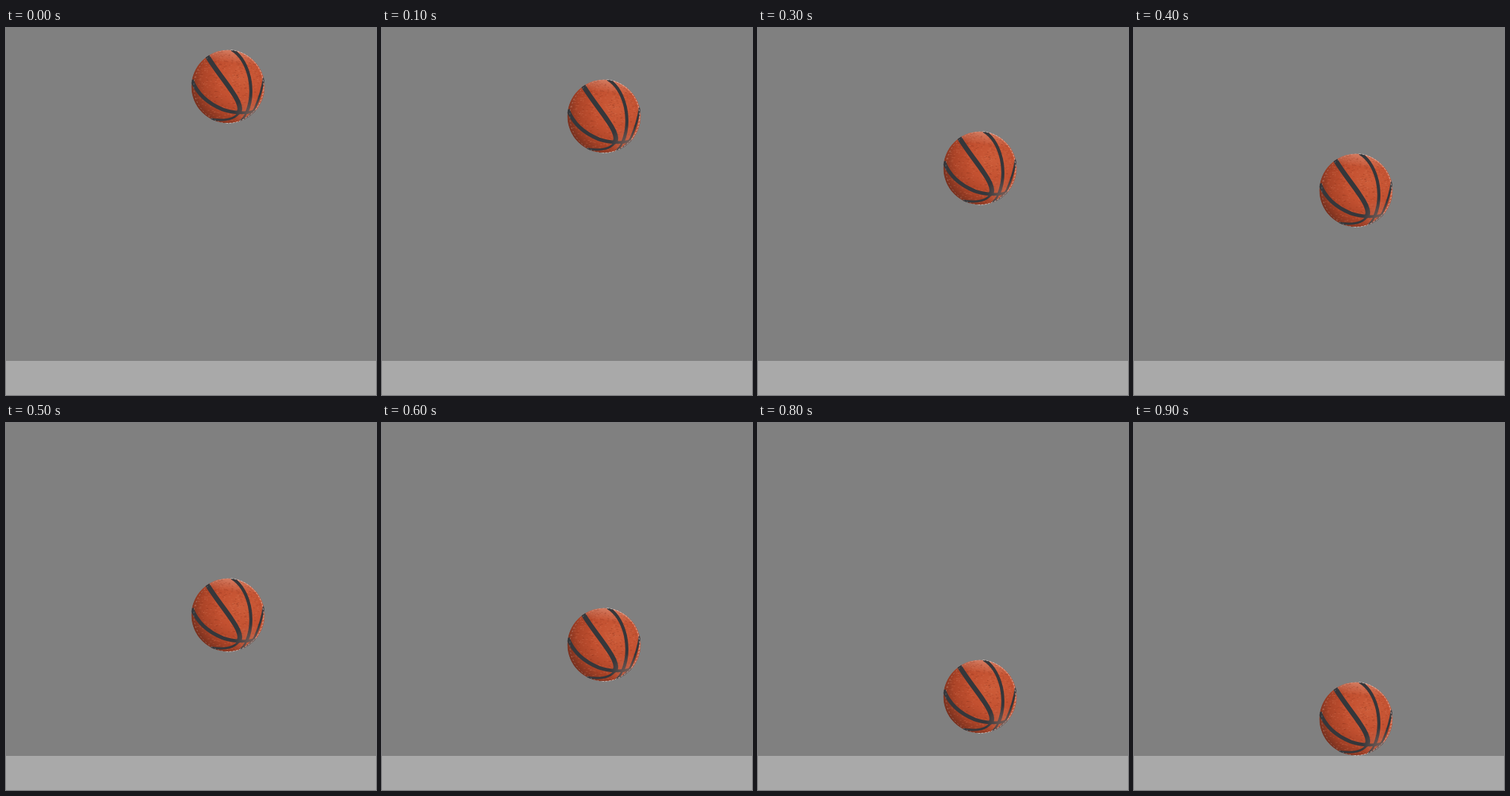
Write an HTML page that moves like this. It is 500 by 495 pixels and loops after 1.7 s.

```html
<!DOCTYPE html>
<html lang="en">
<head>
<meta charset="utf-8">
<title>Falling ball</title>
<style>
  html, body { margin: 0; width: 100%; height: 100%; overflow: hidden; background: #808080; }
  #floor { position: absolute; left: 0; top: 449px; width: 100%; bottom: 0; background: #a9a9a9; }
  #ball { position: absolute; left: 250px; top: 29px; width: 100px; height: 100px; overflow: visible; }
  .seams { fill: none; stroke: #35373b; }
</style>
</head>
<body>
<div id="floor"></div>
<svg id="ball" viewBox="0 0 100 100">
  <defs>
    <radialGradient id="skin" cx="68%" cy="38%" r="72%">
      <stop offset="0" stop-color="#cd5c39"/>
      <stop offset=".45" stop-color="#c25030"/>
      <stop offset=".75" stop-color="#aa4327"/>
      <stop offset="1" stop-color="#74301f"/>
    </radialGradient>
    <linearGradient id="shine" x1=".55" y1="0" x2=".45" y2="1">
      <stop offset="0" stop-color="#f0b09a" stop-opacity=".5"/>
      <stop offset=".18" stop-color="#f0b09a" stop-opacity="0"/>
    </linearGradient>
    <radialGradient id="glow" cx="84%" cy="88%" r="26%">
      <stop offset="0" stop-color="#e09a84" stop-opacity=".4"/>
      <stop offset="1" stop-color="#e09a84" stop-opacity="0"/>
    </radialGradient>
    <clipPath id="round"><circle cx="50" cy="50" r="49.6"/></clipPath>
  </defs>
  <g clip-path="url(#round)">
    <circle cx="50" cy="50" r="49.6" fill="url(#skin)"/>
    <circle cx="50" cy="50" r="49.6" fill="url(#shine)"/>
    <g id="grain" fill="none" stroke-width=".9"></g>
    <g class="seams">
      <path stroke-width="6.4" d="M22 9 C33 27 45 41 55 56 C62 66 66 73 66 80 L65 86"/>
      <path stroke-width="3" d="M65 85 C60 93 48 97 27 94"/>
      <path stroke-width="4.2" d="M55 0 C68 8 75 21 79 38 C83 57 80 74 75 86"/>
      <path stroke-width="2.6" d="M75 85 C73 90 70 94 66 97"/>
      <path stroke-width="5" d="M1 41 C8 59 23 73 43 81 C52 84 58 85 66 85"/>
      <path stroke-width="3.8" d="M65 85 C72 86 79 85 87 83"/>
      <path stroke-width="2.8" d="M98.5 38 C96 56 91 69 86 80 C82 87 77 92 72 95"/>
    </g>
    <circle cx="50" cy="50" r="49.6" fill="url(#glow)"/>
  </g>
  <path fill="none" stroke="#efe6e2" stroke-width=".8" stroke-opacity=".75" stroke-dasharray="3 1.5"
        d="M54 .6 A49.6 49.6 0 0 1 48 99.5"/>
  <path fill="none" stroke="#d9d2cf" stroke-width=".7" stroke-opacity=".45" stroke-dasharray="2 3"
        d="M48 99.5 A49.6 49.6 0 0 1 54 .6"/>
</svg>
<script>
  const LOOP = 1700, STEP = 100, MOVES = 9, SPEED = 36, GRID = 10;
  const ball = document.getElementById('ball');

  // Pebbled leather: short strokes following the curve of the ball.
  let seed = 7;
  const rand = () => (seed = (seed * 16807) % 2147483647) / 2147483647;
  const marks = { '#7c2f1b': '', '#dd8261': '' };
  const colors = Object.keys(marks);
  for (let i = 0; i < 620; i++) {
    const a = rand() * Math.PI * 2, r = Math.sqrt(rand()) * 48;
    const x = 50 + r * Math.cos(a), y = 50 + r * Math.sin(a);
    marks[colors[i % 2]] += `M${x.toFixed(1)} ${y.toFixed(1)}l${(1 + rand() * 2).toFixed(1)} ${((x - 35) / 90).toFixed(2)}`;
  }
  for (const color of colors) {
    const path = document.createElementNS('http://www.w3.org/2000/svg', 'path');
    path.setAttribute('d', marks[color]);
    path.setAttribute('stroke', color);
    path.setAttribute('stroke-opacity', '.28');
    document.getElementById('grain').append(path);
  }

  // Constant fall, snapped to a ten-pixel grid, then a rest on the floor.
  const drop = i => Math.round(i * SPEED / GRID) * GRID;
  const frames = [];
  for (let i = 0; i <= MOVES; i++) {
    frames.push({ offset: i * STEP / LOOP, transform: `translateY(${drop(i)}px)`, easing: 'step-end' });
  }
  frames.push({ offset: 1, transform: `translateY(${drop(MOVES)}px)` });
  ball.animate(frames, { duration: LOOP, iterations: Infinity });
</script>
</body>
</html>
```
